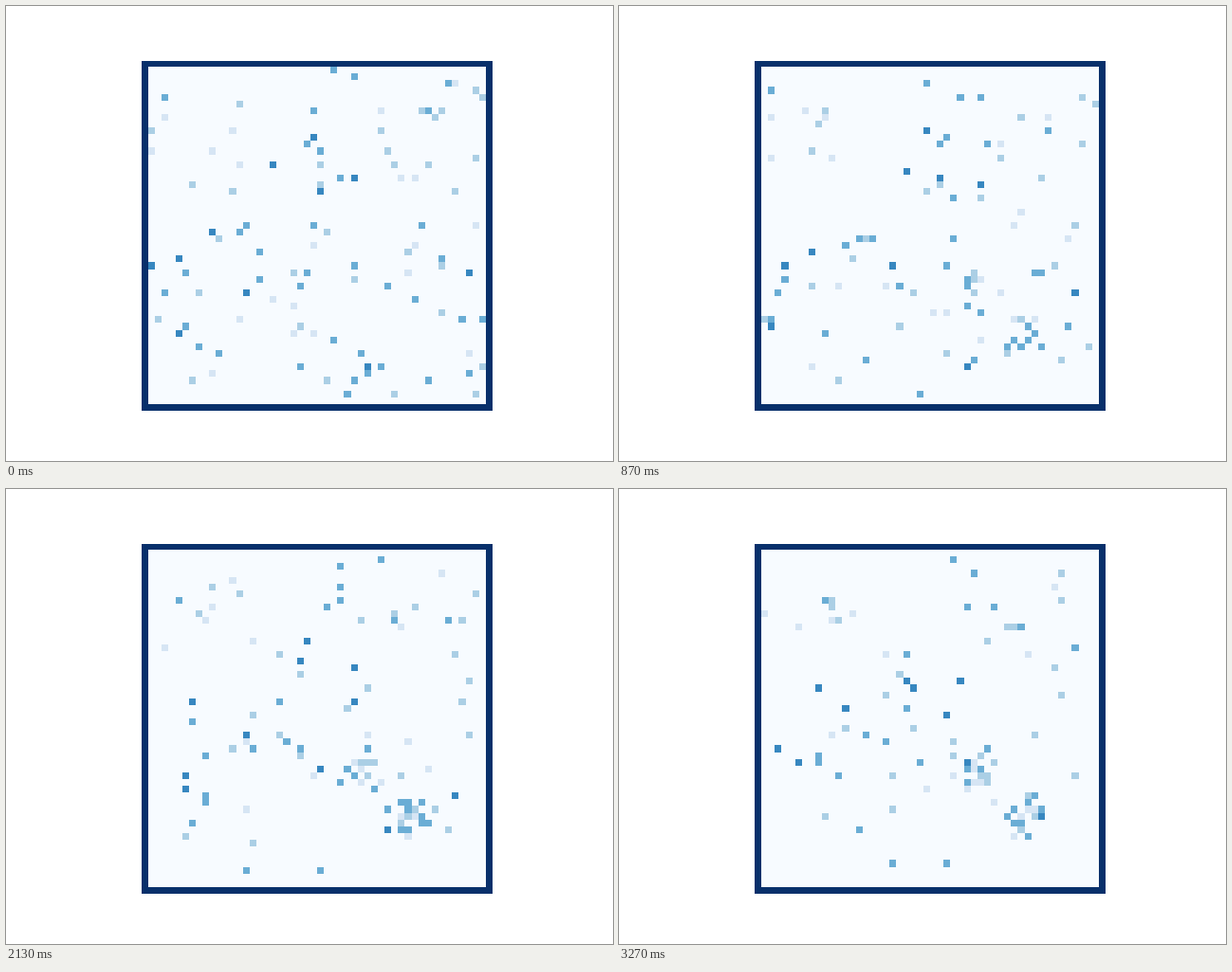
Write a matplotlib script that moves like this. It is 640 by 480 pixels and loops after 3.34 s.

```python
import numpy as np
import matplotlib.pyplot as plt
from matplotlib.animation import FuncAnimation

SIZE, FRAMES, LOOP_MS = 50, 50, 3340
WALL = 6
LEVELS = np.repeat([4, 3, 2, 1], [11, 37, 32, 20])

# Gathering points (column, row) and how strongly each one attracts.
ANCHORS = np.array([(38, 39), (32, 33), (21, 18), (10, 9), (35, 11), (9, 34)])
STRENGTH = np.array([0.45, 0.35, 0.1, 0.1, 0.1, 0.1])


def step(cells, rng):
    """Random walk with a drift to the most attractive gathering point."""
    offsets = ANCHORS - cells[:, None]
    distances = np.hypot(offsets[..., 0], offsets[..., 1]) + 0.01
    best = np.argmax(STRENGTH / distances, axis=1)
    walkers = np.arange(len(cells))
    offset, distance = offsets[walkers, best], distances[walkers, best]

    pull = 0.1 + STRENGTH[best] * np.exp(-distance / 15)
    pull *= np.minimum(1, distance / 4) * (1.5 - 0.2 * LEVELS)
    pulled = rng.random(len(cells)) < pull

    # Stochastic rounding keeps the average course straight.
    heading = offset / np.maximum(np.abs(offset).max(axis=1, keepdims=True), 1)
    toward = np.floor(heading + rng.random(cells.shape)).astype(int)
    wander = rng.integers(-1, 2, cells.shape)
    move = np.where(pulled[:, None], toward, wander)
    return np.clip(cells + move, 0, SIZE - 1)


def simulate():
    rng = np.random.default_rng(7)
    spots = rng.choice(SIZE * SIZE, len(LEVELS), replace=False)
    history = [np.column_stack(np.divmod(spots, SIZE))]
    for _ in range(FRAMES - 1):
        history.append(step(history[-1], rng))
    return history


def board(cells):
    """Walled grid; lighter walkers cover darker ones."""
    grid = np.full((SIZE + 2, SIZE + 2), WALL)
    grid[1:-1, 1:-1] = 0
    for (col, row), level in zip(cells, LEVELS):
        grid[row + 1, col + 1] = level
    return grid


history = simulate()

fig, ax = plt.subplots(figsize=(6.4, 4.8), dpi=100)
fig.subplots_adjust(left=0.125, right=0.9, bottom=0.11, top=0.88)
ax.axis("off")
image = ax.imshow(board(history[0]), cmap="Blues",
                  vmin=0, vmax=WALL, interpolation="nearest")


def update(frame):
    image.set_data(board(history[frame]))
    return [image]


anim = FuncAnimation(fig, update, frames=FRAMES, interval=LOOP_MS / FRAMES,
                     repeat=True, repeat_delay=0)
plt.show()
```
